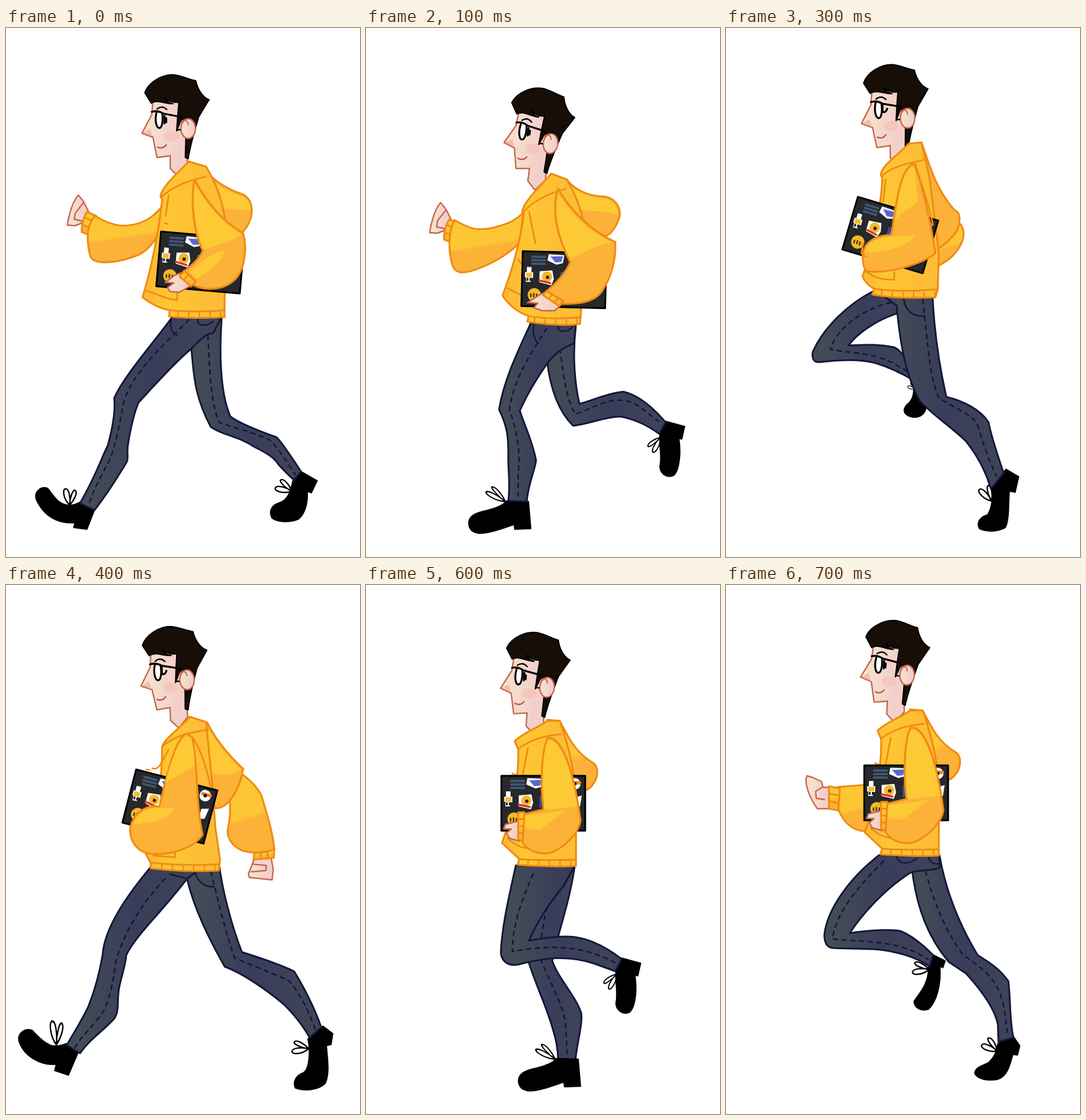
Animation, 612 px wide and 915 px high, one loop 800 ms. Source, as an HTML page without scripts:

```html
<!DOCTYPE html>
<html lang="en">
<head>
<meta charset="utf-8">
<title>Walk cycle</title>
<style>
html,body{margin:0;width:100%;height:100%;overflow:hidden;background:#fff}
svg{display:block;width:100vw;height:100vh}
path,ellipse{stroke-linejoin:round;stroke-linecap:round}
.pose{visibility:hidden;animation:show .8s step-end calc(var(--i)*100ms - 800ms) infinite}
@keyframes show{0%{visibility:visible}12.5%,100%{visibility:hidden}}
.y,.a,.b{fill:url(#cloth);stroke:#ef8b12;stroke-width:3.2}
.a{fill:#fcb138}
.b{fill:url(#torso)}
.h{fill:#fdc934}
.l{fill:none;stroke:#ef8b12;stroke-width:2.8}
.t{fill:none;stroke:#ef8b12;stroke-width:10;stroke-dasharray:2.4 16;stroke-linecap:butt}
.p{fill:url(#denim);stroke:#14163a;stroke-width:3}
.d{fill:none;stroke:#12143a;stroke-width:2.5;stroke-dasharray:7 8}
.q{fill:none;stroke:#14163a;stroke-width:2.5}
.s{fill:url(#skin);stroke:#c4664f;stroke-width:2.4}
.k{fill:#000;stroke:#000;stroke-width:1.8}
.n,.w{fill:none;stroke:#000;stroke-width:2.4}
.w{stroke-width:3.3}
</style>
</head>
<body>
<svg viewBox="0 0 612 915">
<defs>
<linearGradient id="cloth" x1=".3" y1="0" x2=".5" y2="1"><stop offset=".54" stop-color="#fdc634"/><stop offset=".6" stop-color="#fcb138"/></linearGradient>
<linearGradient id="torso"><stop offset=".1" stop-color="#fdbb34"/><stop offset=".3" stop-color="#fec632"/><stop offset=".75" stop-color="#fdbd36"/></linearGradient>
<linearGradient id="denim"><stop offset=".1" stop-color="#434b56"/><stop offset=".5" stop-color="#393d5a"/><stop offset=".9" stop-color="#3e4358"/></linearGradient>
<linearGradient id="skin"><stop offset=".2" stop-color="#f6dfcd"/><stop offset=".8" stop-color="#f2cfca"/></linearGradient>

<g id="head">
  <path class="s" d="M254 126L252 150 235 182 254 189 261 224 284 221V243L298 257 314 238 311 190 304 130 268 118Z"/>
  <ellipse cx="285" cy="187" rx="13" ry="9" fill="#f6b7ac" opacity=".45"/>
  <path d="M236 182L249 174 253 188Z" fill="#f09c8e" opacity=".5"/>
  <path d="M240 112C246 94 270 80 290 81 304 82 318 90 328 91 331 106 340 120 351 124L333 154C326 178 318 204 315 226L310 224 311 190 304 156 295 178 297 150 299 128C290 130 281 126 275 121 278 128 284 130 289 131 273 131 262 123 251 130Z" fill="#170e07" stroke="#000" stroke-width="2.2"/>
  <ellipse class="s" cx="315" cy="174" rx="12.5" ry="17"/>
  <path d="M302 164C306 156 315 160 315 167" fill="none" stroke="#c4664f" stroke-width="2"/>
  <path class="n" d="M261 140Q270 133 278 141M296 176H301"/>
  <path d="M262 206Q271 210 277 202" fill="none" stroke="#b8523f" stroke-width="2.3"/>
  <path d="M260 147C257 160 260 173 265 173S272 160 270 147Z" fill="#fff"/>
  <path class="w" d="M252 145Q262 142 272 148L303 154M260 147C257 160 260 173 265 173S272 160 270 147"/>
</g>
<path id="open" class="w" d="M274 152V165M277 156V163"/>
<path id="shut" class="w" d="M272 150V162Q277 165 280 157"/>

<g id="laptop">
  <path d="M0 0H145V95H0Z" fill="#26282b" stroke="#000" stroke-width="3"/>
  <path d="M17 9H39M17 15H39M17 21H39" stroke="#405672" stroke-width="4"/>
  <path d="M45 4L72 5 70 19 59 22 43 15Z" fill="#f6f7ff"/><path d="M48 8L70 7 67 17 57 18Z" fill="#5867cf"/>
  <path d="M8 27H16V36H19V46H15V53H7V45H5V36H8Z" fill="#fff"/><path d="M7 37H17V45H7Z" fill="#f5bc32"/><path d="M8 46H11V51H8ZM13 46H16V51H13Z" fill="#222"/>
  <path d="M30 34L52 32 55 47 51 58 30 53Z" fill="#fff"/><circle cx="43" cy="43" r="9" fill="#f5b82d"/><circle cx="44" cy="44" r="3" fill="#3b2412"/>
  <path d="M30 50L49 54" stroke="#d8352d" stroke-width="3.5"/>
  <circle cx="22" cy="75" r="11.5" fill="#f6b82a"/><path d="M16 74V78M21 73V78M26 74V79" stroke="#4a3410" stroke-width="2.6"/>
  <path d="M66 35L80 30V55H66Z" fill="#394b9a"/>
  <circle cx="127" cy="14" r="10" fill="#fff"/><path d="M122 12H135" stroke="#e68b2b" stroke-width="6"/><circle cx="127" cy="14" r="3"/>
  <path d="M126 38L139 34 136 53 126 56Z" fill="#fff"/>
</g>

<path id="lace" class="n" d="M0 0C-11-10-13-28-7-28S2-12 0 0C0-12 6-29 10-25S8-8 0 0"/>
<g id="flat">
  <path class="k" d="M-19-1L19 0 23 47-5 48-6 40C-22 45-52 57-68 55-82 53-86 43-84 33-80 21-67 19-52 15-37 11-26 7-19-1Z"/>
  <use href="#lace" transform="translate(-21 0)rotate(-55)scale(.8 1.3)"/>
</g>
<g id="kick">
  <path class="k" d="M518 680L551 689 546 711 541 710C545 735 542 765 532 774 520 780 508 770 508 758 512 740 506 720 508 703Z"/>
  <use href="#lace" transform="translate(509 708)rotate(-142)scale(.8 1)"/>
</g>

<g id="stance">
  <path class="p" d="M270 485C272 540 270 600 285 655 300 700 315 730 325 765 331 785 335 800 335 822H365C368 790 378 760 375 740 365 710 335 680 325 650 335 600 355 550 364 485Z"/>
  <path class="d" d="M332 500C315 560 302 600 306 650 325 695 345 730 348 760L351 815"/>
  <use href="#flat" x="351" y="820"/>
</g>
<g id="swing">
  <use href="#kick" x="-73" y="-35"/>
  <path class="p" d="M262 485C250 540 238 590 236 636 238 654 252 660 268 656 310 645 350 640 395 654L434 668 445 647C410 620 380 608 350 608 325 608 305 612 285 615 300 580 320 550 345 520L364 485Z"/>
  <path class="d" d="M292 500C270 550 256 590 256 634 310 625 370 618 437 655"/>
</g>

<g id="fist">
  <path class="s" d="M125 289C115 300 108 325 106 341L119 342 130 338 144 320 134 300Z"/>
  <path class="s" d="M134 302L120 320 118 331 132 334"/>
  <path class="y" d="M140 318L156 325 147 359 131 353C130 343 135 325 140 318Z"/><path class="l" d="M137 328L151 335M134 341L148 347"/>
</g>
<g id="jacket">
  <path class="y" d="M318 215L340 217C352 240 365 270 395 288 408 295 408 315 395 330 380 345 365 340 355 300Z"/>
  <path class="b" d="M262 252C275 238 305 228 318 217L340 217C362 280 370 330 368 380V468C340 470 300 468 267 466L270 456 240 428C255 390 270 320 268 266Z"/>
  <path class="l" d="M268 266C290 248 315 243 342 240M285 264L276 310M270 456C300 459 340 458 368 457M250 420C265 435 280 438 296 439M258 308L264 311"/>
  <path class="t" d="M284 461Q330 465 366 462"/>
  <use href="#laptop" x="239" y="312"/>
  <path class="s" d="M270 390L246 396 243 404 256 404 248 411 253 420 270 425Z"/>
  <path class="a" d="M319 247C308 270 306 330 312 370L275 379 272 420C280 440 300 450 325 445 350 435 373 410 376 390 368 330 352 255 325 247Z"/>
  <path class="h" d="M319 251C310 272 309 330 314 371L370 365C365 330 350 262 325 250ZM279 381L350 372 305 406 276 402Z"/>
  <path class="y" d="M268 375H279L276 425 268 422Z"/><path class="l" d="M269 387H278M269 399H277M269 411H276"/>
</g>
</defs>

<g class="pose" style="--i:0">
  <use href="#fist"/>
  <path class="y" d="M270 308C250 335 225 342 200 342 180 340 165 332 154 325 140 340 138 365 146 396 155 412 200 405 230 392 245 385 255 372 264 356Z"/>
  <path class="k" d="M510 767L538 783 528 804 521 802C522 820 518 840 505 850 490 856 470 855 460 848 454 838 458 826 470 822 488 818 492 800 496 783Z"/>
  <use href="#lace" transform="translate(494 801)rotate(-65)"/>
  <path class="p" d="M320 553C325 590 322 630 354 690 375 705 400 705 430 725 455 737 465 745 471 755 480 765 490 775 498 782L510 767C495 745 480 720 468 708 440 698 405 685 388 672 378 650 366 600 373 500H330Z"/>
  <path class="d" d="M349 532C352 580 352 640 368 682 390 690 430 700 455 712 470 725 485 750 500 772"/>
  <path class="k" d="M128 820L153 834 140 867 117 864 119 856C90 858 65 845 52 815 48 802 60 792 72 796 80 805 88 822 105 825 115 826 120 824 128 820Z"/>
  <use href="#lace" transform="translate(110 825)"/>
  <path class="p" d="M288 499C255 545 205 600 187 640 190 665 182 700 176 722 162 750 160 765 128 822L153 834C168 815 185 790 208 752 213 745 208 735 211 720 215 695 222 665 229 648 255 620 290 580 320 555 335 540 345 528 358 528L373 499Z"/>
  <path class="d" d="M316 505C270 550 215 600 203 650 195 690 190 720 180 745 165 775 150 800 145 820"/>
  <path class="q" d="M286 503C282 520 288 529 296 531M332 503C328 518 350 516 358 507"/>
  <use href="#head"/><use href="#open"/>
  <path class="a" d="M316 231L346 240 352 254C370 272 395 283 410 288 432 300 428 335 408 354 390 345 360 320 340 285Z"/>
  <path class="h" d="M348 256C368 276 390 286 409 291 420 297 425 308 422 317 400 310 380 320 345 300Z"/>
  <path class="b" d="M267 292C268 275 300 248 316 231L346 240C400 330 375 400 378 500 350 502 310 502 282 499L283 488C262 484 250 476 236 466 250 420 265 350 270 296Z"/>
  <path class="l" d="M268 293C290 272 320 263 346 257M281 290L276 325M275 337L279 339M283 488C310 491 350 491 378 488M243 455C262 459 278 471 296 470V458"/>
  <path class="t" d="M296 494Q340 497 377 495"/>
  <use href="#laptop" transform="translate(268 352)rotate(5)"/>
  <path class="s" d="M304 424C290 425 285 435 275 440L290 441 279 449 284 456 300 457 319 446Z"/>
  <path class="a" d="M326 262C345 300 375 335 410 355 418 385 412 425 390 440 370 455 340 453 325 445L303 425C315 415 335 400 340 385 325 355 318 300 326 262Z"/>
  <path class="h" d="M327 270C345 304 375 339 408 357 390 370 365 376 342 383 328 352 321 304 327 270ZM380 384C355 388 335 405 318 422L328 434C350 425 370 405 380 384Z"/>
  <path class="y" d="M308 420L328 438 320 447 300 430Z"/><path class="l" d="M315 427L307 436"/>
</g>

<g class="pose" style="--i:1">
  <use href="#fist" x="4" y="13"/>
  <path class="y" d="M272 319C262 330 250 337 235 341 215 348 198 349 186 347 172 343 161 337 153 332 143 350 141 385 150 412 155 424 165 424 180 421 215 410 250 390 266 370Z"/>
  <use href="#kick"/>
  <path class="p" d="M313 575C318 620 330 660 358 688 385 685 415 672 440 672 470 678 490 690 507 702L518 682C495 655 470 635 445 629 415 632 390 645 369 650 362 620 356 570 363 512L320 520Z"/>
  <path class="d" d="M335 555C342 600 345 640 362 668 390 660 430 628 470 653L512 685"/>
  <use href="#flat" x="262" y="819"/>
  <path class="p" d="M285 510C262 560 238 610 230 660 245 690 246 710 246 735 245 765 250 785 246 818L278 819C280 790 292 765 294 748 288 715 275 690 266 662 280 630 305 590 320 572 335 555 350 550 360 545L363 510Z"/>
  <path class="d" d="M312 520C280 570 255 610 248 660 262 700 268 740 263 770V812"/>
  <path class="q" d="M290 514C288 530 292 540 298 545M332 516C330 528 350 526 357 517"/>
  <g transform="translate(4 26)rotate(7 315 174)"><use href="#head"/><use href="#open"/></g>
  <path class="a" d="M320 252L347 262C360 280 385 290 405 291 430 291 442 310 438 328 432 345 425 355 415 360 385 350 355 310 345 285Z"/>
  <path class="h" d="M348 268C365 284 390 294 407 294 425 296 437 308 435 324 410 312 380 322 352 308Z"/>
  <path class="b" d="M270 318C272 300 305 270 320 252L347 262C400 350 372 420 372 487L370 512C340 516 305 512 279 508L281 498C262 492 245 477 236 463 250 425 265 380 273 321Z"/>
  <path class="l" d="M271 319C290 298 320 285 345 278M282 318L293 373M281 498C310 504 340 503 371 500M245 450C260 459 280 467 295 470M263 400L268 407"/>
  <path class="t" d="M290 506Q335 512 370 506"/>
  <use href="#laptop" transform="translate(271 386)rotate(1.5)"/>
  <path class="s" d="M311 457C298 460 290 470 279 475L297 476 290 484 305 489 326 489 340 476Z"/>
  <path class="a" d="M332 278C350 310 385 350 431 370 432 400 425 430 408 455 395 475 365 478 335 477L310 457C325 445 345 425 353 405 335 370 318 320 332 278Z"/>
  <path class="h" d="M333 287C352 318 385 353 427 371 400 375 375 388 354 400 337 370 323 322 333 287Z"/>
  <path class="y" d="M312 455L341 472 334 481 306 462Z"/><path class="l" d="M322 461L316 468M332 467L326 475"/>
</g>

<g class="pose" style="--i:2">
  <use href="#swing"/><use href="#stance"/>
  <g transform="translate(2 4)rotate(3 315 174)"><use href="#head"/><use href="#open"/></g>
  <use href="#jacket" x="5" y="18"/>
</g>

<g class="pose" style="--i:3">
  <path class="k" d="M322 608L346 655C345 668 335 675 322 673 308 670 304 662 312 652 322 645 328 632 322 608Z"/>
  <use href="#lace" transform="translate(328 624)rotate(-60)scale(.5)"/>
  <path class="p" d="M255 455C215 475 170 515 150 560 148 572 152 578 160 578 200 574 230 572 260 580 285 588 305 598 322 608L318 585C310 570 300 555 290 552 260 546 235 548 212 549 225 530 260 505 295 494L330 460Z"/>
  <path class="d" d="M285 475C240 485 195 515 180 555 200 562 240 560 270 572 290 578 305 590 317 595"/>
  <path class="k" d="M484 763L506 776 500 803 490 801C488 825 490 850 483 864 470 872 450 872 438 866 432 855 440 845 452 842 460 830 462 810 458 795Z"/>
  <use href="#lace" transform="translate(459 818)rotate(-32)"/>
  <path class="p" d="M270 462L295 480C300 540 310 600 335 645 360 672 390 690 415 715 435 740 450 770 458 797L480 770C470 740 458 705 454 682 440 660 410 645 381 638 370 590 360 530 357 460Z"/>
  <path class="d" d="M340 470C348 530 350 600 368 640 400 660 430 670 436 690 445 720 455 750 468 775"/>
  <path class="q" d="M307 468C310 490 325 500 343 498"/>
  <g transform="translate(-1 -18)rotate(-1 315 174)"><use href="#head"/><use href="#shut"/></g>
  <path class="y" d="M395 335C410 335 414 355 408 370 400 390 385 402 366 412L362 340Z"/>
  <path class="a" d="M316 200L338 198C350 230 360 275 395 315 408 320 404 335 400 350 385 370 370 382 362 382L340 260Z"/>
  <path class="b" d="M268 255C266 240 295 222 316 200L338 198 352 260 368 390 366 452 362 466C330 467 290 468 253 461L256 451C250 448 240 440 236 430 245 405 270 310 270 258Z"/>
  <path class="l" d="M269 257C290 236 320 234 346 227M276 262L272 300M256 451C290 456 330 455 365 452M240 420C260 435 275 436 291 435V422"/>
  <path class="t" d="M268 458Q320 464 362 460"/>
  <use href="#laptop" transform="translate(228 292)rotate(16.5)"/>
  <path class="a" d="M324 235C308 240 300 270 295 300 288 330 290 345 285 358 260 358 240 370 237 388 235 405 238 418 245 421 280 425 335 410 362 390 355 340 338 270 327 235Z"/>
  <path class="h" d="M323 240C309 248 302 275 298 300L293 330 332 300 326 242ZM285 361C262 361 244 370 240 387 275 390 315 378 328 358Z"/>
  <path class="l" d="M326 238C342 275 351 310 358 340M237 372L234 390 242 396"/>
</g>

<g class="pose" style="--i:4">
  <path class="s" d="M430 472L419 500 421 506 460 510 462 492 458 470Z"/><path class="s" d="M428 483L450 485 449 494 424 496"/>
  <path class="y" d="M430 456H464L463 472 428 475Z"/><path class="l" d="M440 460V474M452 459V472"/>
  <path class="y" d="M405 325C420 335 435 350 442 365 450 395 460 420 464 457 450 463 430 465 410 460 390 452 380 435 384 420 390 395 387 375 386 365Z"/>
  <path class="k" d="M548 763L565 776 562 795 554 797C556 820 560 845 552 862 540 874 515 876 500 870 495 858 502 848 515 843 525 835 526 805 522 785Z"/>
  <use href="#lace" transform="translate(523 802)rotate(-85)"/>
  <path class="p" d="M312 505C325 560 350 610 378 660 410 672 450 700 480 725 500 745 515 765 525 783L545 765C535 735 515 695 498 668 470 655 440 645 408 635 390 590 375 530 369 488H310Z"/>
  <path class="d" d="M354 496C370 560 380 600 395 645 430 660 470 675 490 685 510 710 525 740 535 770"/>
  <path class="k" d="M104 793L126 806 108 848 84 840 87 829C60 832 30 815 22 788 20 775 32 766 45 770 55 780 65 792 80 797 92 798 98 796 104 793Z"/>
  <use href="#lace" transform="translate(87 795)scale(1 1.45)"/>
  <path class="p" d="M250 488C215 530 170 590 167 640 160 680 150 710 142 730 130 755 115 778 105 796L128 810C145 785 170 770 187 750 198 735 190 715 197 690 203 665 207 655 208 640 225 605 270 565 313 508L340 488Z"/>
  <path class="d" d="M275 508C235 550 205 600 190 650 185 690 180 710 170 735 150 765 130 780 118 802"/>
  <path class="q" d="M283 500L313 508M327 495C330 514 345 523 360 522"/>
  <g transform="translate(-2 -10)rotate(-2 315 174)"><use href="#head"/><use href="#shut"/></g>
  <path class="a" d="M318 228L348 238C358 260 380 290 410 318 405 350 385 388 362 386 350 350 330 290 325 260Z"/>
  <path class="h" d="M346 240C358 265 380 293 407 319 385 332 365 330 345 320Z"/>
  <path class="b" d="M270 280C272 268 300 248 318 228L346 237 357 350 362 420 370 475 368 494C330 496 290 495 250 490V480L242 466C255 430 270 350 270 280Z"/>
  <path class="l" d="M270 280C290 260 320 255 350 250M281 285L266 312Q260 320 253 317M243 319L248 320M250 480C290 485 330 485 369 483M255 468L292 471V460"/>
  <path class="t" d="M268 487Q320 491 368 488"/>
  <use href="#laptop" transform="translate(225 319)rotate(14.5)"/>
  <path class="a" d="M312 257C292 265 278 330 265 383 240 380 222 395 215 418 212 440 225 462 250 465 285 468 325 455 340 432 328 380 332 310 322 263Z"/>
  <path class="h" d="M312 261C296 270 284 310 275 343L326 312C326 295 324 280 320 265ZM264 386C240 384 225 398 219 414 255 412 285 405 290 385Z"/>
  <path class="l" d="M322 263C340 290 347 320 354 350"/>
</g>

<g class="pose" style="--i:5">
  <path class="s" d="M412 474L392 503 425 514 445 512 447 482Z"/><path class="s" d="M411 488L432 490 436 499 405 500"/>
  <path class="y" d="M415 458L453 462 447 483 410 476Z"/><path class="l" d="M426 464L423 479M439 465L436 481"/>
  <path class="y" d="M425 343C440 350 450 360 455 375 465 400 472 425 470 445 465 460 440 466 420 462 405 460 395 450 394 440 400 415 405 395 408 370Z"/>
  <path class="k" d="M268 812H298L304 850 281 851 279 845C255 848 235 855 215 854 198 852 194 838 199 826 208 816 222 821 240 822 252 822 260 818 268 812Z"/>
  <use href="#lace" transform="translate(254 819)rotate(-22)"/>
  <path class="p" d="M260 501C240 555 215 610 207 660 225 690 245 720 255 745 262 770 265 790 266 812H294C292 790 300 765 299 742 290 720 270 705 256 668 265 640 285 600 303 572L340 501Z"/>
  <path class="d" d="M292 525C265 570 240 620 231 660 245 685 262 705 270 740 274 770 275 790 276 810"/>
  <path class="k" d="M482 655L523 663 526 685 519 688C530 710 537 740 530 760 522 772 508 772 503 760 500 740 502 725 495 705 490 698 485 692 480 683Z"/>
  <use href="#lace" transform="translate(494 697)rotate(-120)scale(.9 1.1)"/>
  <path class="p" d="M275 501L303 527C300 580 308 650 327 705 335 716 345 716 355 712 380 705 400 690 430 684 450 680 465 682 480 684L482 657C465 650 445 638 430 640 405 645 380 655 357 665 356 620 362 560 367 501Z"/>
  <path class="d" d="M341 508C340 570 335 640 340 690 360 690 385 670 430 663L475 664"/>
  <path class="q" d="M275 519L302 527M316 505C315 525 325 534 338 535"/>
  <g transform="translate(-1 22)rotate(7 315 174)translate(-12 -8)scale(1.04)"><use href="#head"/><use href="#open"/></g>
  <path class="a" d="M312 250L342 256C355 280 385 300 420 303 430 310 432 330 428 350 420 370 400 387 375 386 355 380 335 320 325 285Z"/>
  <path class="h" d="M343 262C358 285 385 303 419 306 427 312 428 325 426 335 400 325 375 350 345 330Z"/>
  <path class="b" d="M264 297C275 275 295 265 314 251L342 257C352 300 350 340 362 385 375 430 380 465 391 488L380 494 375 505C340 505 295 503 260 500L262 490 246 478C255 430 267 350 268 300Z"/>
  <path class="l" d="M265 298C285 280 320 272 346 270M274 305L264 322Q255 331 243 329M230 330L234 331M262 491C300 496 340 496 382 493M258 477L285 480"/>
  <path class="t" d="M274 496Q330 502 375 499"/>
  <use href="#laptop" transform="translate(218 335)rotate(13.5)"/>
  <path class="a" d="M299 277C282 285 270 330 265 375L262 400C240 402 220 415 213 440 210 460 222 478 250 480 290 480 330 455 346 425 335 380 330 310 304 277Z"/>
  <path class="h" d="M299 281C285 292 275 330 269 370L295 345 318 325 303 281ZM262 403C240 405 224 418 218 434 255 428 290 418 300 395Z"/>
  <path class="l" d="M304 277C330 290 344 330 354 366"/>
</g>

<g class="pose" style="--i:6">
  <use href="#stance" x="-3"/><use href="#swing" x="-3"/>
  <g transform="translate(-2 3)rotate(4.5 315 174)"><use href="#head"/><use href="#open"/></g>
  <use href="#jacket" x="-5" y="18"/>
</g>

<g class="pose" style="--i:7">
  <path class="s" d="M140 330C135 340 142 365 158 387L180 387 182 350 168 350 165 340 150 333Z"/><path class="s" d="M168 349L155 357 156 369 170 371"/>
  <path class="y" d="M250 344C225 348 205 348 190 350L192 380C198 405 215 425 240 426L262 400Z"/>
  <path class="y" d="M178 348L197 352 194 390 178 387Z"/><path class="l" d="M178 361L195 364M178 374L194 377"/>
  <path class="k" d="M470 793L497 781 508 797 504 813 496 812C490 835 485 850 470 855 455 858 435 856 430 845 430 833 445 832 455 825 465 815 468 805 470 793Z"/>
  <use href="#lace" transform="translate(469 806)rotate(-55)"/>
  <path class="p" d="M322 495C330 560 350 610 385 652L415 672C445 705 465 735 470 760L471 790 497 783C490 755 492 710 488 685 470 660 450 650 435 640 405 590 380 530 369 467H320Z"/>
  <path class="d" d="M345 495C360 550 380 600 410 640 440 660 465 680 475 710 485 740 483 765 488 780"/>
  <path class="k" d="M355 638L379 650 375 662 370 660C372 690 365 720 350 734 338 738 325 732 325 720 335 705 350 690 350 662Z"/>
  <use href="#lace" transform="translate(351 665)rotate(-85)"/>
  <path class="p" d="M265 467C215 505 175 560 170 605 170 620 175 627 185 628 220 630 260 627 290 635 315 640 335 648 352 660L358 640C340 622 320 605 300 598 270 595 240 598 214 602 235 570 275 525 320 497 340 492 360 495 370 488L368 467Z"/>
  <path class="d" d="M272 478C220 530 190 570 184 612 230 618 300 612 350 648"/>
  <path class="q" d="M295 470C300 486 318 482 330 473M350 470C352 480 360 484 369 482"/>
  <g transform="translate(-2 -18)rotate(3.5 315 174)"><use href="#head"/><use href="#open"/></g>
  <use href="#jacket"/>
</g>
</svg>
</body>
</html>
```
